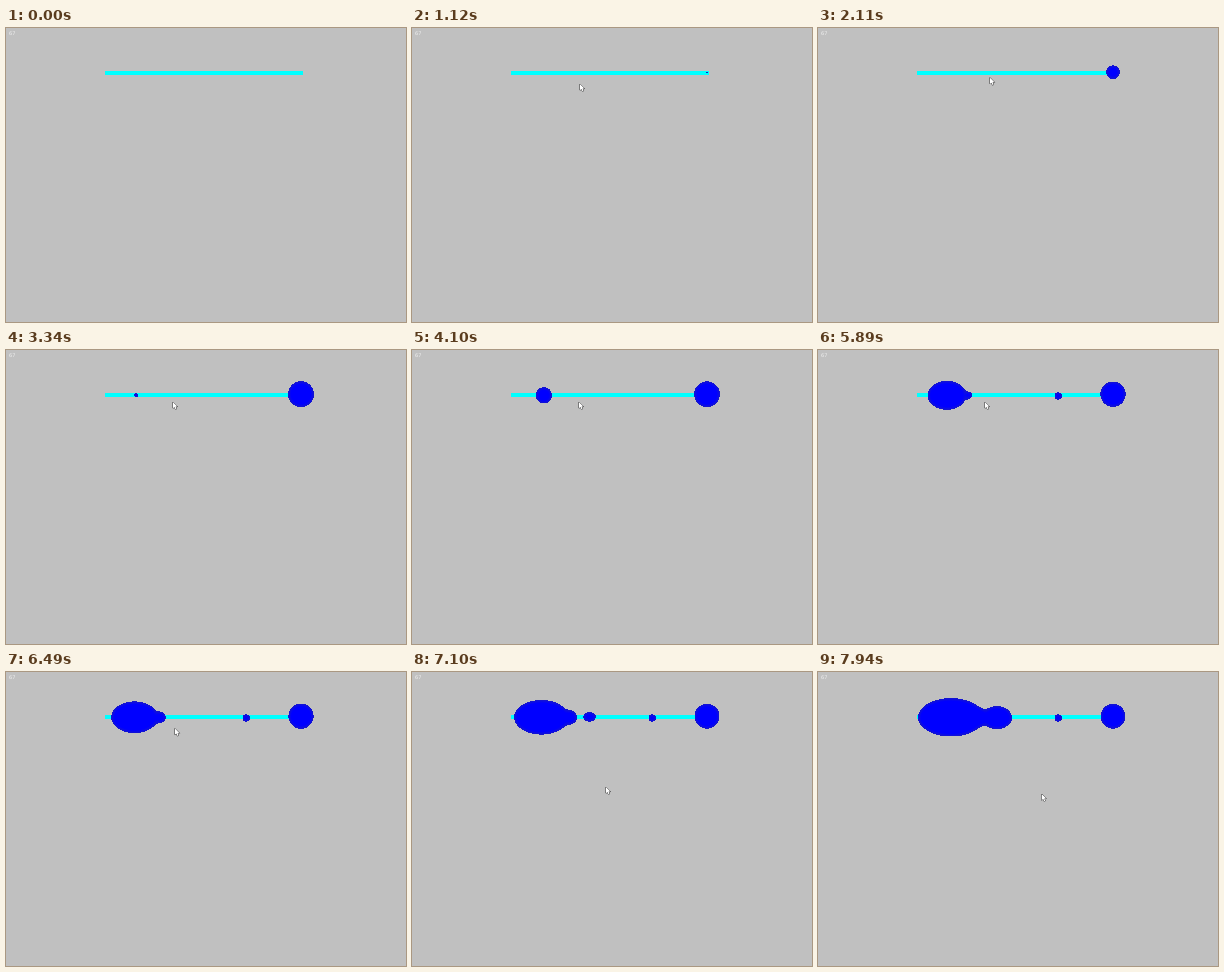
Recreate the animation shown at these times as an HTML page with a canvas. Size 400x294 px, loop 7.99 s.

```html
<!DOCTYPE html>
<html lang="en">
<head>
<meta charset="utf-8">
<title>Drops on a bar</title>
<style>
  html, body { margin: 0; height: 100%; overflow: hidden; background: #c0c0c0; }
  canvas { display: block; }
</style>
</head>
<body>
<canvas id="stage" width="400" height="294"></canvas>
<script>
const ctx = document.getElementById('stage').getContext('2d', { willReadFrequently: true });
const DURATION = 7990;
const BLEND = 4;       // how far apart drops start to flow together
const RIM = 3;         // depth over which the edge shade fades
const POOL = { x: 94, y: 22, width: 220, height: 48 };

const ramp = (time, start, end) => Math.min(1, Math.max(0, (time - start) / (end - start)));
const smooth = p => p * p * (3 - 2 * p);
const mix = (a, b, p) => a + (b - a) * p;
const drop = (x, y, rx, ry = rx) => ({ x, y, rx, ry });

function dropsAt(time) {
  const right = ramp(time, 950, 2900) ** 1.25;
  const seed = smooth(ramp(time, 2800, 4900));
  const spread = ramp(time, 4800, 7940);
  const speck = Math.sqrt(ramp(time, 4700, 5890));
  const tail = ramp(time, 5450, 7940);
  const tailSize = Math.sqrt(tail);
  const front = ramp(time, 6500, 7940);

  return [
    drop(295, 44.2, 13 * right - .6 * ramp(time, 2900, 7940)),
    drop(129.5 + 3.5 * seed - 18 * spread * (1 - spread), 45.3,
         12 * seed + 21 * spread, 12 * seed + 7.2 * spread),
    drop(240.2, 46, 3.7 * speck),
    drop(147.5 + 14 * tail, 45.4, 10 * tailSize, 9 * tailSize),
    drop(176.5 + 2.5 * front, mix(44.3, 45.6, front), 15 * front, 11.5 * front),
  ].filter(({ rx }) => rx > .5);
}

// Approximate signed distance to an ellipse.
function distance({ x, y, rx, ry }, px, py) {
  const dx = px - x + 1e-4, dy = py - y;
  const scaled = Math.hypot(dx / rx, dy / ry);
  return scaled * (scaled - 1) / Math.hypot(dx / rx ** 2, dy / ry ** 2);
}

function smoothMin(a, b) {
  const overlap = Math.max(BLEND - Math.abs(a - b), 0);
  return Math.min(a, b) - overlap ** 2 / (4 * BLEND);
}

function drawDrops(time) {
  const drops = dropsAt(time);
  if (!drops.length) return;
  const image = ctx.getImageData(POOL.x, POOL.y, POOL.width, POOL.height);
  for (let i = 0; i < POOL.width * POOL.height; i++) {
    const px = POOL.x + i % POOL.width + .5;
    const py = POOL.y + Math.floor(i / POOL.width) + .5;
    const depth = -drops.map(d => distance(d, px, py)).reduce(smoothMin);
    if (depth < 0) continue;
    const core = Math.min(1, depth / RIM);
    const tint = mix(22, 0, core);
    image.data.set([tint, tint, mix(205, 255, core)], i * 4);
  }
  ctx.putImageData(image, POOL.x, POOL.y);
}

// Each move eases the pointer to a place and leaves it there.
const moves = [
  { start: 80, end: 400, x: 169, y: 44 },
  { start: 550, end: 750, x: 168, y: 56 },
  { start: 1400, end: 2100, x: 172, y: 49.7 },
  { start: 2200, end: 2900, x: 167, y: 52 },
  { start: 6400, end: 6950, x: 194, y: 115 },
  { start: 7200, end: 7900, x: 223.7, y: 122 },
];
const arrow = new Path2D('M0 0V6.2L1.5 5L2.5 7.4L3.5 7L2.6 4.6H4.5Z');

function drawPointer(time) {
  if (time < 80) return;
  let x = 332, y = 258;
  for (const move of moves) {
    const p = smooth(ramp(time, move.start, move.end));
    x = mix(x, move.x, p);
    y = mix(y, move.y, p);
  }
  ctx.save();
  ctx.translate(x, y);
  ctx.strokeStyle = '#333';
  ctx.lineWidth = 1;
  ctx.stroke(arrow);
  ctx.fillStyle = '#fff';
  ctx.fill(arrow);
  ctx.restore();
}

function draw(time) {
  ctx.fillStyle = '#c0c0c0';
  ctx.fillRect(0, 0, 400, 294);
  ctx.fillStyle = '#eee';
  ctx.font = '5px "DejaVu Sans", sans-serif';
  ctx.fillText('67', 3, 7);
  ctx.fillStyle = '#0ff';
  ctx.fillRect(99, 43, 198, 4);
  drawDrops(time);
  drawPointer(time);
}

function tick() {
  draw(performance.now() % DURATION);
  requestAnimationFrame(tick);
}
tick();
</script>
</body>
</html>
```
